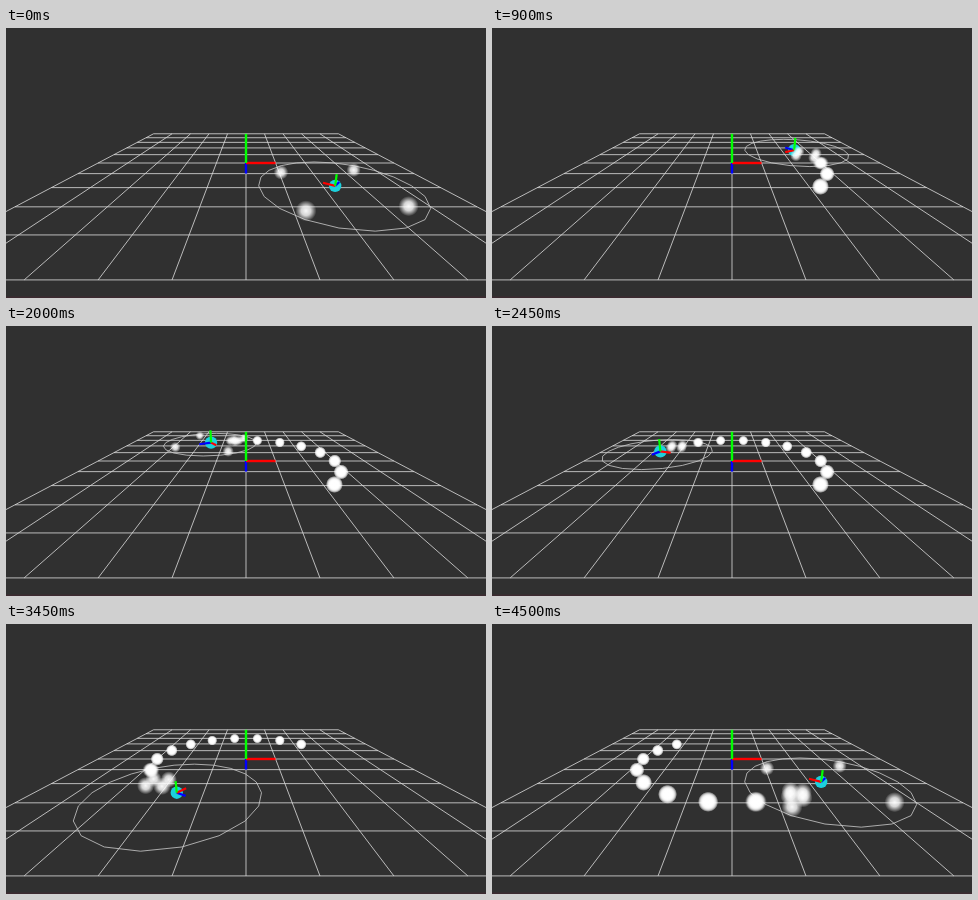
These frames come from a looping animation (480 by 270 pixels, 4550 ms). An HTML page with a canvas:

```html
<!DOCTYPE html>
<html lang="en">
<head>
<meta charset="utf-8">
<title>Orbiting trail</title>
<style>
  html, body { margin: 0; width: 100%; height: 100%; overflow: hidden; background: #303030; }
  canvas { display: block; }
</style>
</head>
<body>
<canvas id="stage" width="480" height="270"></canvas>
<script>
const ctx = document.getElementById('stage').getContext('2d');
const STEP = 50, STEPS = 91;
const ORBIT = 3, RING = 2, EMIT = 5, GROUPS = 10;
const RED = '#f00', GREEN = '#0f0', BLUE = '#00f';
const rad = deg => deg * Math.PI / 180;

// Camera at (0, 2.5, 7.5) looking at the origin, 60 degree field of view
const DIST = Math.hypot(2.5, 7.5);
const SIN = 2.5 / DIST, COS = 7.5 / DIST;
const FOCAL = 135 / Math.tan(rad(30));

function project([x, y, z]) {
  const scale = FOCAL / (DIST - COS * z - SIN * y);
  return { x: 240 + x * scale, y: 135 - (COS * y - SIN * z) * scale, scale };
}

const polar = (deg, r, x = 0, z = 0) =>
  [x + r * Math.cos(rad(deg)), 0, z + r * Math.sin(rad(deg))];

function path(points, color, width) {
  ctx.beginPath();
  for (const p of points) {
    const { x, y } = project(p);
    ctx.lineTo(x, y);
  }
  ctx.strokeStyle = color;
  ctx.lineWidth = width;
  ctx.stroke();
}

function drawGrid() {
  for (let i = -5; i <= 5; i++) {
    path([[-5, 0, i], [5, 0, i]], '#ddd', 0.8);
    path([[i, 0, -5], [i, 0, 5]], '#ddd', 0.8);
  }
}

function drawAxes() {
  const o = [0, 0, 0];
  path([o, [0, 0, 1]], BLUE, 2.4);
  path([o, [1, 0, 0]], RED, 2.4);
  path([o, [0, 1, 0]], GREEN, 2.4);
}

function drawRing([x, , z]) {
  const points = [];
  for (let a = 0; a <= 360; a += 18) points.push(polar(a, RING, x, z));
  path(points, '#ccc', 0.8);
}

function drawBall(pos) {
  const { x, y, scale } = project(pos);
  const r = 0.22 * scale;
  const g = ctx.createRadialGradient(x, y, 0, x, y, r);
  g.addColorStop(0, 'rgba(255,255,255,.97)');
  g.addColorStop(0.45, 'rgba(255,255,255,.8)');
  g.addColorStop(1, 'rgba(255,255,255,0)');
  ctx.fillStyle = g;
  ctx.beginPath();
  ctx.arc(x, y, r, 0, 2 * Math.PI);
  ctx.fill();
}

// Marker of constant screen size; blue points along the direction of travel
function drawMarker(pos, angle) {
  const { x, y, scale } = project(pos);
  const [px, , pz] = pos, len = 12.5 / scale;
  ctx.fillStyle = '#1cd0dc';
  ctx.beginPath();
  ctx.arc(x, y, 6.2, 0, 2 * Math.PI);
  ctx.fill();
  path([pos, polar(angle - 90, len, px, pz)], BLUE, 2.2);
  path([pos, polar(angle + 180, len, px, pz)], RED, 2.2);
  path([pos, [px, len, pz]], GREEN, 2.2);
}

function draw(n) {
  ctx.fillStyle = '#303030';
  ctx.fillRect(0, 0, 480, 270);
  ctx.fillStyle = '#3c2a30';
  ctx.fillRect(0, 268.5, 480, 1.5);

  const angle = 39 - 4 * n;
  const pos = polar(angle, ORBIT);
  drawGrid();
  drawRing(pos);

  const items = [
    { z: 0, draw: drawAxes },
    { z: pos[2], draw: () => drawMarker(pos, angle) }
  ];
  // Each group of four starts on the ring and closes in on its emission point
  const last = Math.floor(n / EMIT);
  for (let k = Math.max(0, last - GROUPS + 1); k <= last; k++) {
    const start = 40 - 20 * k;
    const [cx, , cz] = polar(start, ORBIT);
    const r = RING * 0.9 ** (2 + 4 * (n - k * EMIT));
    for (let q = 0; q < 4; q++) {
      const p = polar(start + 90 * q, r, cx, cz);
      items.push({ z: p[2], draw: () => drawBall(p) });
    }
  }
  items.sort((a, b) => a.z - b.z).forEach(item => item.draw());
}

const begin = performance.now();
function tick() {
  const t = performance.now() - begin;
  draw(Math.floor(t / STEP) % STEPS);
  requestAnimationFrame(tick);
}
tick();
</script>
</body>
</html>
```
